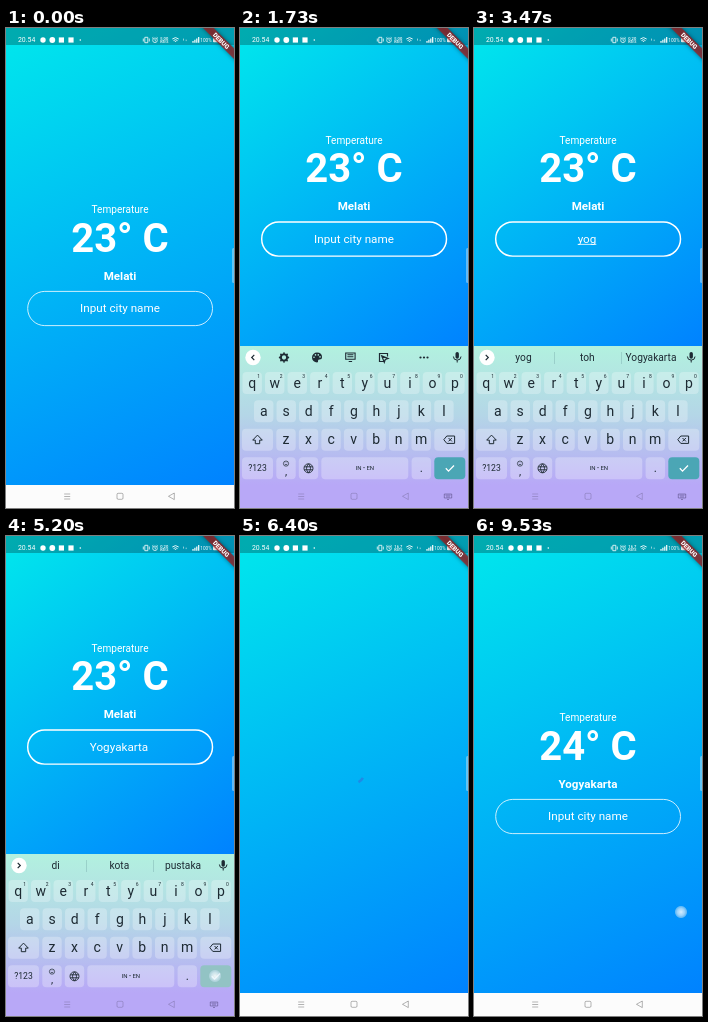
An HTML page with a canvas for the animation above (9.59 s loop, 228 by 480 pixels).

```html
<!DOCTYPE html>
<html lang="id">
<head>
<meta charset="utf-8">
<title>Weather app</title>
<style>
html, body { margin: 0; height: 100%; overflow: hidden; background: #fff; }
canvas { display: block; width: 228px; height: 480px; }
</style>
</head>
<body>
<canvas id="stage"></canvas>
<script>
const LOOP = 9590, W = 228, H = 480, KB_TOP = 318, NAV_TOP = 457;
const FOCUS = 1200, KB_SHOW = 1230, RESIZE = 1400, SUBMIT = 5340, KB_HIDE = 5400, LOADED = 6930;
const INK = '#1d2a33';
const canvas = document.getElementById('stage');
const g = canvas.getContext('2d');
const dpr = window.devicePixelRatio || 1;
canvas.width = W * dpr;
canvas.height = H * dpr;

// time, field text, suggestions
const edits = [
  [0, '', null],
  [2130, 'y', ['y', '', '']],
  [2400, 'yo', ['yo', '', '']],
  [2630, 'yog', ['yog', 'toh', 'Yogyakarta']],
  [4300, 'Yogyakarta', ['di', 'kota', 'pustaka']]
];
// x, y, from, to
const touches = [
  [114, 280, 930, 1070], [124, 356, 2070, 2210], [191, 356, 2340, 2470], [114, 383, 2570, 2710],
  [178, 333, 4130, 4320], [209, 440, 5190, 5350], [213, 377, 8730, 8930], [207, 376, 9470, 9600]
];

const clamp = v => Math.max(0, Math.min(1, v));
const ramp = (t, from, ms) => clamp((t - from) / ms);
const easeOut = p => 1 - (1 - p) ** 2;

// cubic-bezier(.4, 0, .2, 1)
function ease(x) {
  let lo = 0, hi = 1, s;
  for (let i = 0; i < 16; i++) {
    s = (lo + hi) / 2;
    const bx = 1.2 * s * (1 - s) ** 2 + 0.6 * s * s * (1 - s) + s ** 3;
    if (bx < x) lo = s; else hi = s;
  }
  return 3 * s * s * (1 - s) + s ** 3;
}

function text(str, x, y, size, color = '#fff', weight = 400, align = 'center') {
  g.font = `${weight} ${size}px Roboto, sans-serif`;
  g.textAlign = align;
  g.fillStyle = color;
  g.fillText(str, x, y);
}
function box(x, y, w, h, r, fill) {
  g.beginPath();
  g.roundRect(x, y, w, h, r);
  g.fillStyle = fill;
  g.fill();
}
function disc(x, y, r, fill) {
  g.beginPath();
  g.arc(x, y, r, 0, 7);
  g.fillStyle = fill;
  g.fill();
}
// path centred on x, y
function icon(d, x, y, color, width = 1, fill = false) {
  g.save();
  g.translate(x, y);
  g.lineWidth = width;
  g.strokeStyle = g.fillStyle = color;
  const p = new Path2D(d);
  if (fill) g.fill(p, 'evenodd'); else g.stroke(p);
  g.restore();
}

function background(bottom) {
  // isolines run perpendicular to the diagonal
  const grad = g.createLinearGradient(0, 0, W, bottom);
  grad.addColorStop(0, '#00e8ec');
  grad.addColorStop(1, '#0082ff');
  g.fillStyle = grad;
  g.fillRect(0, 0, W, bottom);
}

function weather(t, dy, value) {
  const done = t >= LOADED;
  g.save();
  g.translate(0, dy);
  text('Temperature', 114, 185, 10.1);
  text(done ? '24° C' : '23° C', 114, 223.7, 40, '#fff', 700);
  text(done ? 'Yogyakarta' : 'Melati', 114, 251.5, 11.6, '#fff', 700);

  g.lineWidth = 0.8 + (done ? 0 : 0.65 * ramp(t, 1330, 200));
  g.strokeStyle = '#fff';
  g.beginPath();
  g.roundRect(21.7, 263.4, 184.8, 34.2, 17);
  g.stroke();

  const str = done ? '' : value;
  if (str) text(str, 113, 284, 11.7);
  else text('Input city name', 114, 284, 11.7);
  const width = str ? g.measureText(str).width : 0;
  if (str && t < 4300) {
    g.fillStyle = '#fff';
    g.fillRect(113 - width / 2, 285.4, width, 0.8);
  }
  if (!done && t >= FOCUS) {
    const last = Math.max(FOCUS, ...edits.map(e => e[0]).filter(s => s <= t));
    if (Math.floor((t - last) / 500) % 2 === 0) {
      g.fillStyle = '#2196f3';
      g.fillRect(113 + width / 2, 273.5, 1.3, 13);
    }
  }
  g.restore();
}

function spinner(t, cy) {
  const age = t - SUBMIT, u = age / 1333 % 1;
  const head = ease(clamp(u * 2)), tail = ease(clamp(u * 2 - 1));
  const start = Math.PI * (-0.5 + 1.5 * tail + 2 * age / 2222 + 0.5 * u);
  g.beginPath();
  g.arc(114, cy, 10.1, start, start + Math.max(0.01, 1.5 * Math.PI * (head - tail)));
  g.lineWidth = 2.5;
  g.strokeStyle = '#1f8ae6';
  g.stroke();
}

function statusBar(t) {
  g.fillStyle = 'rgba(0,0,0,.26)';
  g.fillRect(0, 0, W, 17);
  text('20.54', 12, 14.4, 6.9, '#fff', 400, 'left');
  disc(37, 12, 2.7, '#fff');
  disc(46.3, 12, 2.9, '#fff');
  box(52.8, 9.4, 5.2, 5.2, 0, '#fff');
  box(62.4, 9.4, 5.2, 5.2, 0, '#fff');
  disc(74.3, 12, 0.8, '#fff');
  icon('M-1.5-2.7h3v5.4h-3zM-3-1.5v3M3-1.5v3', 140.3, 12, '#fff', 0.8);
  icon('M2.3 0A2.3 2.3 0 1 1-2.3 0A2.3 2.3 0 1 1 2.3 0M0-1.3V.2L1 .8M-3-2l1.3-1M3-2l-1.3-1', 149, 12.3, '#fff', 0.7);
  text(t < 3000 ? '5,00' : t < 5400 ? '0,20' : '16,7', 158.3, 11.6, 4.1, '#fff', 500);
  text('KB/S', 158.3, 15, 3.6, '#fff', 500);
  icon('M-3.2-1Q0-3.8 3.2-1M-2 .6Q0-1.2 2 .6M-.7 2L0 1.3L.7 2', 169.5, 12, '#fff', 0.9);
  icon('M-1.5-1v2M1.2 0v1.5', 179, 11.6, 'rgba(255,255,255,.7)', 0.8);
  for (let i = 0; i < 4; i++) box(186.4 + i * 1.9, 13 - i * 1.3, 1.2, 1.7 + i * 1.3, 0, '#fff');
  text('100%', 200, 13.8, 4.7, '#fff');
  box(207, 9.7, 7.6, 4.6, 1, '#fff');
}

function banner() {
  g.save();
  g.translate(215.2, 12.8);
  g.rotate(Math.PI / 4);
  g.shadowColor = 'rgba(0,0,0,.6)';
  g.shadowBlur = 4 * dpr;
  g.fillStyle = 'rgba(165,24,26,.72)';
  g.fillRect(-30, -3.8, 60, 7.6);
  g.shadowColor = 'transparent';
  text('DEBUG', 0, 2.3, 6.3, '#fff', 900);
  g.restore();
}

function navIcons(kb) {
  const color = `rgba(0,0,0,${0.33 - 0.15 * kb})`;
  icon('M-3-2.5h6M-3 0h6M-3 2.5h6', 61.2, 468.5, color, 0.9);
  icon('M-1.8-3h3.6q1.2 0 1.2 1.2v3.6q0 1.2-1.2 1.2h-3.6q-1.2 0-1.2-1.2v-3.6q0-1.2 1.2-1.2z', 114, 468.3, color, 0.9);
  icon('M2.8-3.3v6.6L-3 0z', 165.5, 468.3, color, 0.9);
  g.globalAlpha = kb;
  icon('M-3.7-2.5h7.4v4h-7.4zM-2.5-1.3h5M-2 .4h4M-1 3h2', 208, 468.5, 'rgba(70,60,110,.6)', 0.8);
  g.globalAlpha = 1;
}

function key(label, x, y, w = 19.4, size = 14) {
  box(x - w / 2, y - 11, w, 22, 4, 'rgba(255,255,255,.27)');
  if (label) text(label, x, y + size * 0.33, size, INK);
}
function keyRow(letters, x, y) {
  [...letters].forEach((c, i) => key(c, x + i * 22.53, y));
}

function toolbar() {
  icon('M3.1 0A3.1 3.1 0 1 1-3.1 0A3.1 3.1 0 1 1 3.1 0', 44, 329.5, INK, 1.9);
  for (let i = 0; i < 8; i++) {
    const a = i * Math.PI / 4;
    disc(44 + 4.3 * Math.cos(a), 329.5 + 4.3 * Math.sin(a), 0.9, INK);
  }
  icon('M0-5A5 5 0 1 0 0 5Q1.5 5 1 3.2Q1 2 2.5 2Q5 2 5-.5Q5-5 0-5z', 77, 329.5, INK, 1, true);
  [[-3, -0.3], [-1.5, -2.6], [1.3, -2.6], [3, -0.6]].forEach(([x, y]) => disc(77 + x, 329.5 + y, 0.8, '#b3efe0'));
  icon('M-4.7-4.5h9.4v6.2h-9.4zM-3-2.7h6M-3-.8h6M-1.7 4h3.4', 110.4, 329.5, INK, 1.1);
  icon('M4-1v-3h-8v8h4M-1.8-1.6L4.6 1L1.8 2L.8 4.8z', 143.5, 329.5, INK, 1.2);
  for (const x of [180.5, 184, 187.5]) disc(x, 329.5, 1.1, INK);
}

function suggestions(words) {
  words.forEach((w, i) => text(w, [49.5, 113.3, 177][i], 333, 10.2, INK));
  box(80, 324, 0.7, 12, 0, 'rgba(40,80,90,.25)');
  box(147, 324, 0.7, 12, 0, 'rgba(40,80,90,.25)');
}

function keyboard(t, shown, words) {
  g.save();
  g.globalAlpha = shown;
  g.translate(0, 103 * (1 - shown));
  const grad = g.createLinearGradient(0, KB_TOP, 0, NAV_TOP);
  grad.addColorStop(0, '#b2f1df');
  grad.addColorStop(0.5, '#b4d6e7');
  grad.addColorStop(1, '#b8a8f7');
  g.fillStyle = grad;
  g.fillRect(0, KB_TOP, W, H - KB_TOP);

  const numbers = t < 1480;
  if (numbers) {
    [...'1234567890'].forEach((c, i) => text(c, 12 + i * 22.53, 335, 12.5, INK));
  } else {
    disc(13, 329.5, 7.7, '#fff');
    icon(words ? 'M-1.3-2.6L1.3 0L-1.3 2.6' : 'M1.3-2.6L-1.3 0L1.3 2.6', 13, 329.5, INK, 1.2);
    if (words) suggestions(words); else toolbar();
    box(215.5, 324, 3.4, 6.8, 1.7, INK);
    icon('M-3.8-1Q-3.8 2.6 0 2.6Q3.8 2.6 3.8-1M0 2.6V5', 217.2, 329.5, INK, 1);
  }

  keyRow('qwertyuiop', 12.2, 355);
  if (!numbers) [...'1234567890'].forEach((c, i) => text(c, 18.6 + i * 22.53, 350.3, 5, INK));
  keyRow('asdfghjkl', 23.7, 383.3);
  keyRow('zxcvbnm', 46, 411.7);
  key('', 17.5, 411.7, 31);
  icon('M0-4.6L4.8 .4H2.2V4H-2.2V.4H-4.8z', 17.5, 411.7, INK, 1);
  key('', 209.8, 411.7, 31);
  icon('M-5.5 0L-2.5-3.7H5.3V3.7H-2.5zM-.8-1.7L2.6 1.7M2.6-1.7L-.8 1.7', 209.3, 411.7, INK, 1);

  key('?123', 17.5, 440.3, 31, 8.6);
  key('', 46, 440.3);
  icon('M2.6 0A2.6 2.6 0 1 1-2.6 0A2.6 2.6 0 1 1 2.6 0M-1.2 .6Q0 1.8 1.2 .6M-.9-.9v.4M.9-.9v.4', 46, 435.6, INK, 0.7);
  text(',', 46, 446.5, 11, INK);
  key('', 68.5, 440.3);
  icon('M4.5 0A4.5 4.5 0 1 1-4.5 0A4.5 4.5 0 1 1 4.5 0M-4.2-1.5H4.2M-4.2 1.5H4.2M0-4.5Q-4 0 0 4.5Q4 0 0-4.5', 68.5, 440.3, INK, 0.9);
  key('IN • EN', 124.8, 440.3, 87, 6);
  key('.', 181.3, 440.3, 19.4, 12);
  const pressed = t >= 5190 && t < 5350;
  box(194.3, 429.3, 31, 22, 4, pressed ? '#92c3c4' : '#4ba6b5');
  icon('M-4 0L-1.3 2.8L4.2-2.8', 209.8, 440.3, '#fff', 1.3);
  g.restore();
}

function touch([x, y, from, to], t) {
  if (t < from || t >= to) return;
  g.globalAlpha = clamp((to - t) / 70);
  const grad = g.createRadialGradient(x, y, 0, x, y, 6.5);
  grad.addColorStop(0, 'rgba(255,255,255,.85)');
  grad.addColorStop(0.55, 'rgba(225,240,250,.7)');
  grad.addColorStop(0.85, 'rgba(200,225,240,.5)');
  grad.addColorStop(1, 'rgba(200,225,240,0)');
  disc(x, y, 6.5, grad);
  g.globalAlpha = 1;
}

function draw(t) {
  const [, value, words] = edits.filter(e => e[0] <= t).pop();
  const shown = easeOut(ramp(t, KB_SHOW, 300)) * (1 - ramp(t, KB_HIDE, 250));
  const bottom = t >= RESIZE && t < KB_HIDE ? KB_TOP : NAV_TOP;
  const dy = (bottom - NAV_TOP) / 2;

  g.setTransform(dpr, 0, 0, dpr, 0, 0);
  background(NAV_TOP);
  if (bottom < NAV_TOP) background(bottom);
  if (t >= SUBMIT && t < LOADED) spinner(t, 237 + dy);
  else weather(t, dy, value);
  statusBar(t);
  box(0, NAV_TOP, W, H - NAV_TOP, 0, '#fcfcfc');
  if (shown > 0) keyboard(t, shown, words);
  navIcons(shown);
  box(226, 220, 3, 35, 1.5, 'rgba(190,225,245,.5)');
  banner();
  touches.forEach(p => touch(p, t));
}

const begin = performance.now();
function frame() {
  draw((performance.now() - begin) % LOOP);
  requestAnimationFrame(frame);
}
frame();
</script>
</body>
</html>
```
